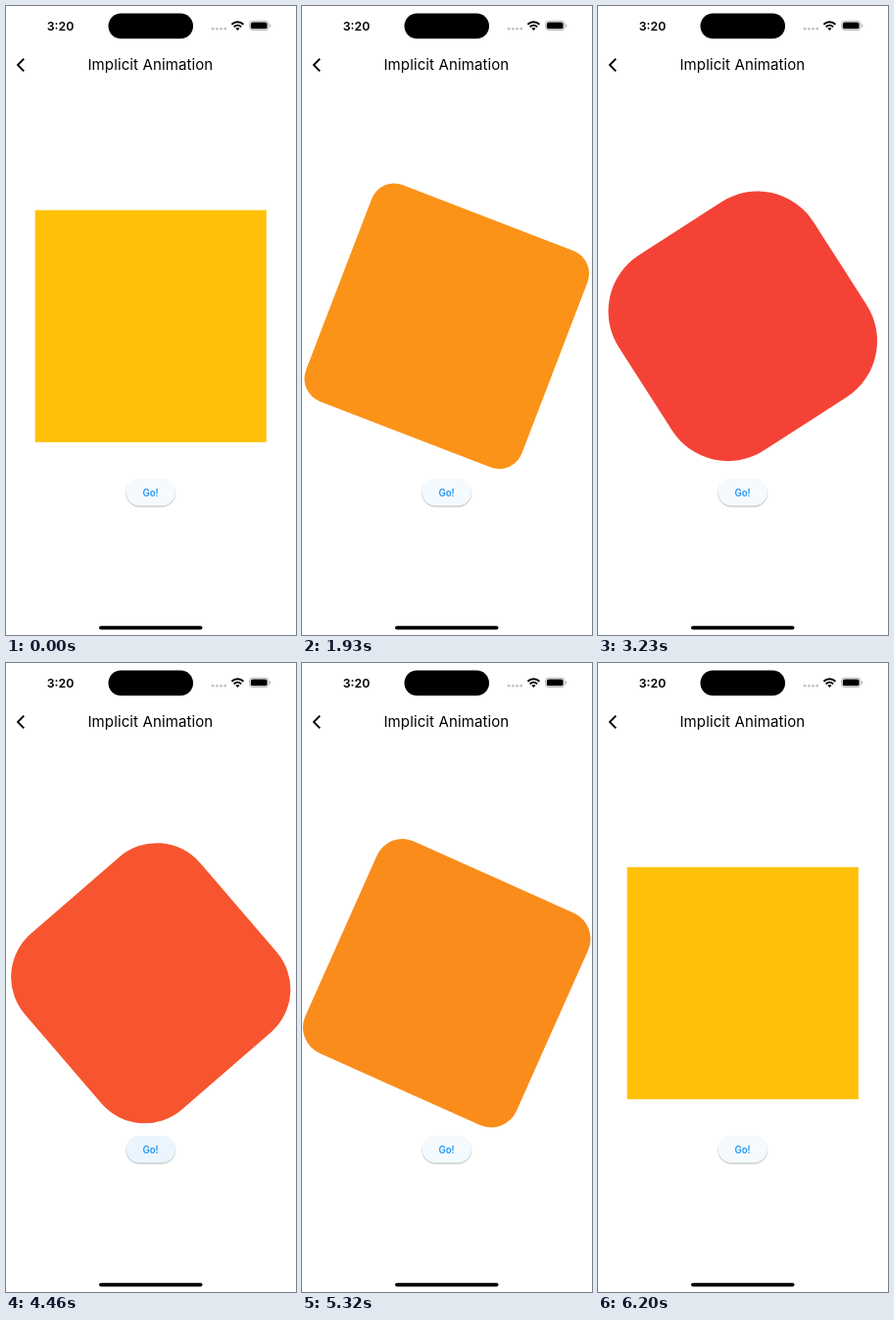
Write an HTML page that moves like this. It is 296x640 px and loops after 7410 ms.

```html
<!DOCTYPE html>
<html lang="en">
<head>
<meta charset="utf-8">
<title>Implicit Animation</title>
<style>
  html, body { margin: 0; width: 100%; height: 100%; overflow: hidden; background: #fff; }
  svg { display: block; width: 296px; height: 640px; }
  text { font-family: Inter, sans-serif; text-anchor: middle; }
</style>
</head>
<body>
<svg viewBox="0 0 296 640">
  <!-- status bar -->
  <text x="55.5" y="24.5" font-size="12.3" font-weight="600">3:20</text>
  <rect x="104.5" y="7.6" width="86.5" height="25.6" rx="12.8"/>
  <g fill="#c4c4c4">
    <circle cx="211" cy="23.2" r="1.4"/><circle cx="215.4" cy="23.2" r="1.4"/>
    <circle cx="219.6" cy="23.2" r="1.4"/><circle cx="223.6" cy="23.2" r="1.4"/>
  </g>
  <path d="M230.4 18.7a8.6 8.6 0 0 1 12 0M232.7 21.2a5.4 5.4 0 0 1 7.4 0" fill="none" stroke="#000" stroke-width="2"/>
  <path d="M234.3 22.8a3.2 3.2 0 0 1 4.2 0L236.4 25z"/>
  <rect x="248.5" y="15.2" width="19.4" height="9.4" rx="3" fill="none" stroke="#a6a6a6" stroke-width=".8"/>
  <rect x="249.8" y="16.5" width="16.8" height="6.8" rx="1.9"/>
  <path d="M269 18.3a1.7 1.7 0 0 1 0 3.2z" fill="#a6a6a6"/>

  <!-- app bar -->
  <path d="M18.3 53.7L12 60l6.3 6.3" fill="none" stroke="#000" stroke-width="1.8"/>
  <text x="147.4" y="65.4" font-size="15" letter-spacing=".12">Implicit Animation</text>

  <rect id="box" x="29.7" y="207.7" width="236.1" height="236.1"/>

  <!-- button with its soft shadow -->
  <rect x="122" y="481.4" width="51.4" height="28.8" rx="14.4" fill="#000" opacity=".1"/>
  <rect x="122.5" y="481.6" width="50.4" height="27.8" rx="13.9" fill="#000" opacity=".14"/>
  <rect id="button" x="122.5" y="481" width="50.4" height="27.4" rx="13.7"/>
  <text x="147.6" y="498.6" font-size="9.7" font-weight="600" fill="#2196f3">Go!</text>

  <rect x="95" y="630.7" width="105.5" height="3.8" rx="1.9"/>
</svg>
<script>
const LOOP = 7410, DURATION = 2000;
const FIRST_TAP = 1160, SECOND_TAP = 4000;
const TICK = 109.5, TICK_LEAD = 20; // the picture refreshes once per tick (ms)
const AMBER = [255, 193, 7], RED = [244, 67, 54];
const IDLE = [244, 250, 254], PRESSED = [228, 241, 253];
const MAX_RADIUS = 67.8, MAX_ANGLE = 180 / Math.PI; // one radian

const box = document.getElementById('box');
const button = document.getElementById('button');
const ramp = (t, start, length) => Math.min(1, Math.max(0, (t - start) / length));
const mix = (a, b, p) => `rgb(${a.map((v, i) => Math.round(v + (b[i] - v) * p))})`;
const sinceTap = (time, tap) => Math.floor((time - tap + TICK_LEAD) / TICK) * TICK;
const highlight = t => ramp(t, -60, 120) - ramp(t, 335, 260);

function draw(time) {
  const first = sinceTap(time, FIRST_TAP);
  const second = sinceTap(time, SECOND_TAP);

  // each tap starts a linear change after the finger lifts
  const p = ramp(first, 32, DURATION) - ramp(second, 155, DURATION);
  box.setAttribute('rx', MAX_RADIUS * p);
  box.setAttribute('transform', `rotate(${MAX_ANGLE * p} 147.75 325.75)`);
  box.setAttribute('fill', mix(AMBER, RED, p));

  button.setAttribute('fill', mix(IDLE, PRESSED, highlight(first) + highlight(second)));
}

const start = performance.now();
function frame() {
  draw((performance.now() - start) % LOOP);
  requestAnimationFrame(frame);
}
frame();
</script>
</body>
</html>
```
